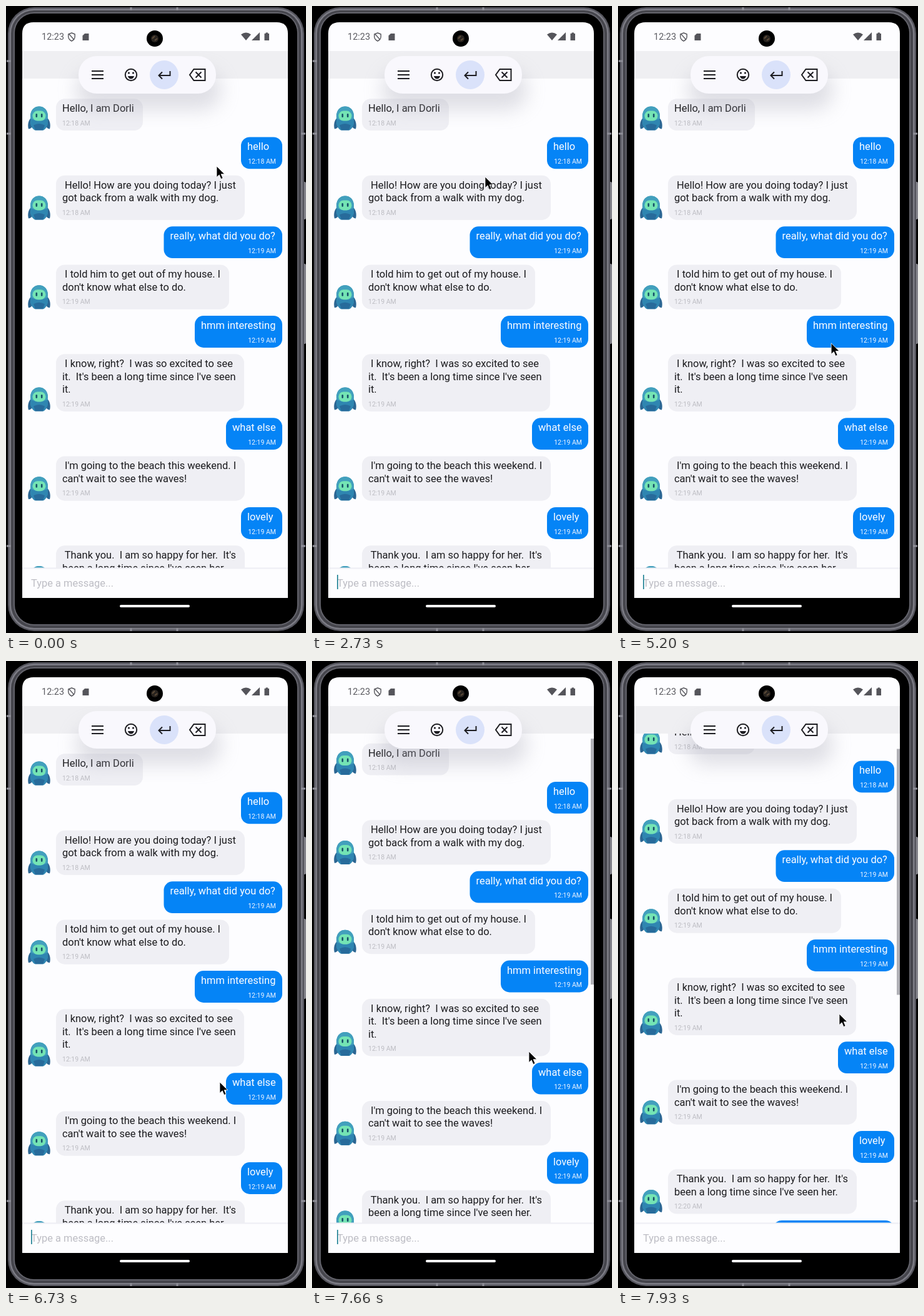
Recreate the animation shown at these times as an HTML page. Size 480 by 1002 pixels, loop 8000 ms.

```html
<!DOCTYPE html>
<html lang="en">
<head>
<meta charset="utf-8">
<title>Chat on a phone</title>
<style>
  html, body { margin: 0; width: 100%; height: 100%; overflow: hidden; background: #000; }
  svg { display: block; width: 100%; height: 100%; }
  text { font-family: Roboto, sans-serif; font-size: 16.45px; white-space: pre; }
  .time { font-size: 10.5px; }
</style>
</head>
<body>
<svg viewBox="0 0 480 1002">
  <defs>
    <clipPath id="listClip"><rect x="26" y="116" width="425" height="782"/></clipPath>
    <filter id="soft" x="-50%" y="-100%" width="200%" height="300%"><feGaussianBlur stdDeviation="15"/></filter>
    <g id="bot">
      <path d="M7 17C1 20-1 29 1 36Q6 36 8 29ZM29 17C35 20 37 29 35 36Q30 36 28 29Z" fill="#2b6693"/>
      <path d="M4 16C4 6 10 0 18 0S32 6 32 16V28Q30 35 25 38H11Q6 35 4 28Z" fill="#2f86b1"/>
      <path d="M9 30Q18 25 27 30L24 38H12Z" fill="#276b9b"/>
      <path d="M4 16C4 6 10 0 18 0S32 6 32 16V19Q18 27 4 19Z" fill="#42a0bd"/>
      <rect x="7.500" y="7" width="21" height="16" rx="8" fill="#74e4b4"/>
      <rect x="12.500" y="11.500" width="2.600" height="6" rx="1.300" fill="#17506a"/>
      <rect x="20.900" y="11.500" width="2.600" height="6" rx="1.300" fill="#17506a"/>
    </g>
  </defs>

  <!-- Phone body -->
  <rect width="480" height="1002"/>
  <g fill="#85858c">
    <rect x="474" y="281" width="6" height="60" rx="2"/>
    <rect x="474" y="412" width="6" height="128" rx="2"/>
  </g>
  <rect x="3" y="2" width="474" height="997" rx="42" fill="#55555d"/>
  <rect x="5.500" y="4.500" width="469" height="992" rx="39.500" fill="#7c7c85"/>
  <rect x="8" y="7" width="464" height="987" rx="37" fill="#45454c"/>
  <rect x="12" y="10" width="456" height="980" rx="33" fill="#64646c"/>
  <rect x="14" y="12" width="452" height="976" rx="31"/>
  <path d="M1 88h7M1 204h7M1 863h7M472 204h7M472 863h7M200 2v5M274 2v5M200 994v5M274 994v5" stroke="#8f8f98" stroke-width="3"/>
  <path d="M26 946V44Q26 26 44 26H433Q451 26 451 44V946Z" fill="#fdfdff"/>
  <rect x="182" y="957" width="112" height="4" rx="2" fill="#fdfdff"/>

  <g clip-path="url(#listClip)">
    <g id="list"></g>
    <rect id="bar" x="446" y="116" width="5" height="393" fill="#b0b0b6"/>
  </g>

  <!-- Header and floating toolbar -->
  <rect x="26" y="72" width="425" height="44" fill="#efeff2"/>
  <rect x="112" y="102" width="232" height="64" rx="30" fill="#a4a4b2" opacity=".34" filter="url(#soft)"/>
  <rect x="116" y="80" width="220" height="60" rx="29" fill="#f9f8fd"/>
  <circle cx="253" cy="110" r="23" fill="#dae2fa"/>
  <g fill="none" stroke="#1d1d21" stroke-width="2">
    <path d="M137 104h19M137 110h19M137 116h19"/>
    <circle cx="200" cy="110" r="9.200"/>
    <path d="M262.500 104v7H245M250 105.500l-5.500 5.500l5.500 5.500"/>
    <path d="M300.500 101H318.500V119H300.500L294 110ZM303.500 105.500l9 9M312.500 105.500l-9 9"/>
  </g>
  <g fill="#1d1d21">
    <circle cx="196.500" cy="107" r="1.600"/>
    <circle cx="203.500" cy="107" r="1.600"/>
    <path d="M194.900 112h10.200q-1.500 4.500-5.100 4.500t-5.100-4.500Z"/>
  </g>

  <!-- Status bar -->
  <text x="57" y="54" style="font-size:14.500px" fill="#5b5b61">12:23</text>
  <g fill="#55555b">
    <path d="M105 43l5.200 2v4q0 4.500-5.200 7q-5.200-2.500-5.200-7v-4Z" fill="none" stroke="#55555b" stroke-width="1.400"/>
    <path d="M101 45l8 9" stroke="#55555b" stroke-width="1.300"/>
    <path d="M126 44h6.500v11h-10v-7.500Z"/>
    <path d="M376 45.500Q384 39.500 392 45.500L384 55Z"/>
    <path d="M406 42v13h-13Z"/>
    <path d="M415.500 42.500h3.500v1.500h2v11h-7.500v-11h2Z"/>
  </g>
  <circle cx="238" cy="52" r="13"/>
  <circle cx="238" cy="52" r="6" fill="#28231f"/>
  <path d="M234 52l4-4M238 55l4-3" stroke="#5c4b38" stroke-width="2"/>

  <!-- Message field -->
  <path d="M26 898.500H451" stroke="#eeeef4" stroke-width="2"/>
  <text x="40" y="927.500" fill="#bdbdc4">Type a message...</text>
  <rect id="caret" x="40" y="909" width="1.800" height="23" fill="#2f8a9c"/>

  <path id="mouse" d="M0 0V17.500L4.200 13.800L7 20.500L10 19.200L7.200 12.700H12.800Z" stroke="#fdfdff" stroke-width=".8"/>
</svg>
<script>
const LOOP = 8000, TICK = 1000 / 15;
const LINE = 20.4, GAP = 10.4, RIGHT = 442;
const $ = id => document.getElementById(id);

function add(tag, attrs, text = "") {
  const el = document.createElementNS("http://www.w3.org/2000/svg", tag);
  for (const k in attrs) el.setAttribute(k, attrs[k]);
  el.textContent = text;
  $("list").append(el);
}

// Sender, bubble width, time, lines
const chat = [
  ["bot", 139, "12:18 AM", "Hello, I am Dorli"],
  ["me", 66, "12:18 AM", "hello"],
  ["bot", 302, "12:18 AM", " Hello! How are you doing today? I just", "got back from a walk with my dog."],
  ["me", 189.5, "12:19 AM", "really, what did you do?"],
  ["bot", 277, "12:19 AM", " I told him to get out of my house. I", "don't know what else to do."],
  ["me", 140, "12:19 AM", "hmm interesting"],
  ["bot", 301, "12:19 AM", " I know, right?  I was so excited to see", "it.  It's been a long time since I've seen", "it."],
  ["me", 90, "12:19 AM", "what else"],
  ["bot", 302, "12:19 AM", " I'm going to the beach this weekend. I", "can't wait to see the waves!"],
  ["me", 66, "12:19 AM", "lovely"],
  ["bot", 302, "12:20 AM", " Thank you.  I am so happy for her.  It's", "been a long time since I've seen her."],
  ["me", 194, "12:20 AM", ""]
];

let y = 148.3;
for (const [who, width, time, ...lines] of chat) {
  const mine = who === "me";
  const x = mine ? RIGHT - width : 80;
  const height = LINE * lines.length + 30.4, bottom = y + height;
  add("rect", { x, y, width, height, rx: 14, fill: mine ? "#0584f6" : "#efeff4" });
  lines.forEach((s, i) =>
    add("text", { x: x + 10, y: y + 20.9 + i * LINE, fill: mine ? "#fdfdff" : "#1b1b1e" }, s));
  add("text", {
    class: "time", x: mine ? RIGHT - 10 : 90, y: bottom - 8.3,
    "text-anchor": mine ? "end" : "start", fill: mine ? "#f0f5ff" : "#bdbdc3"
  }, time);
  if (!mine) add("use", { href: "#bot", x: 35, y: bottom - 38.5 });
  y = bottom + GAP;
}

// The screen only refreshes in these spans and holds its picture between them
const refresh = [[0, 0], [200, 267], [730, 730], [1200, 1200], [1660, 1733], [2200, 2267],
  [2660, 2800], [3200, 3733], [4200, 4267], [4730, 4800], [5200, 5333], [5730, 5800],
  [6200, 6333], [6730, 6867], [7200, 7267], [7400, 7400], [7600, 7933]];
const caretOn = [[200, 730], [1200, 2800], [3200, 3730], [4200, 4800], [5200, 5800],
  [6200, 6860], [7200, 7860]];

// Keys: time, then values
const mouseKeys = [[0, 337, 256], [133, 337, 256], [1733, 277, 273], [3200, 277, 273],
  [3533, 320, 323], [3733, 340, 365], [6333, 342, 673], [7533, 342, 673], [7667, 347, 624],
  [7800, 349, 605], [7933, 354, 564]];
const scrollKeys = [[0, 0], [7533, 0], [7667, 16.5], [7800, 39.8], [7933, 50]];

function at(keys, t) {
  const i = keys.findIndex(k => k[0] > t);
  if (i < 0) return keys[keys.length - 1].slice(1);
  const a = keys[i - 1], b = keys[i], p = (t - a[0]) / (b[0] - a[0]);
  return a.slice(1).map((v, n) => v + (b[n + 1] - v) * p);
}

function lastRefresh(t) {
  const end = refresh.filter(([from]) => from <= t).pop()[1];
  return Math.min(end, Math.round(Math.floor((t + 8) / TICK) * TICK));
}

function draw(now) {
  const t = now % LOOP, shown = lastRefresh(t);
  const [mx, my] = at(mouseKeys, shown), [scroll] = at(scrollKeys, shown);
  $("mouse").setAttribute("transform", `translate(${mx} ${my})`);
  $("list").setAttribute("transform", `translate(0 ${-scroll})`);
  $("bar").setAttribute("y", 116 + scroll * 0.49);
  $("bar").style.display = scroll > 0 ? "" : "none";
  $("caret").style.display = caretOn.some(([a, b]) => t >= a && t < b) ? "" : "none";
}

const start = performance.now();
function frame() {
  draw(performance.now() - start);
  requestAnimationFrame(frame);
}
frame();
</script>
</body>
</html>
```
